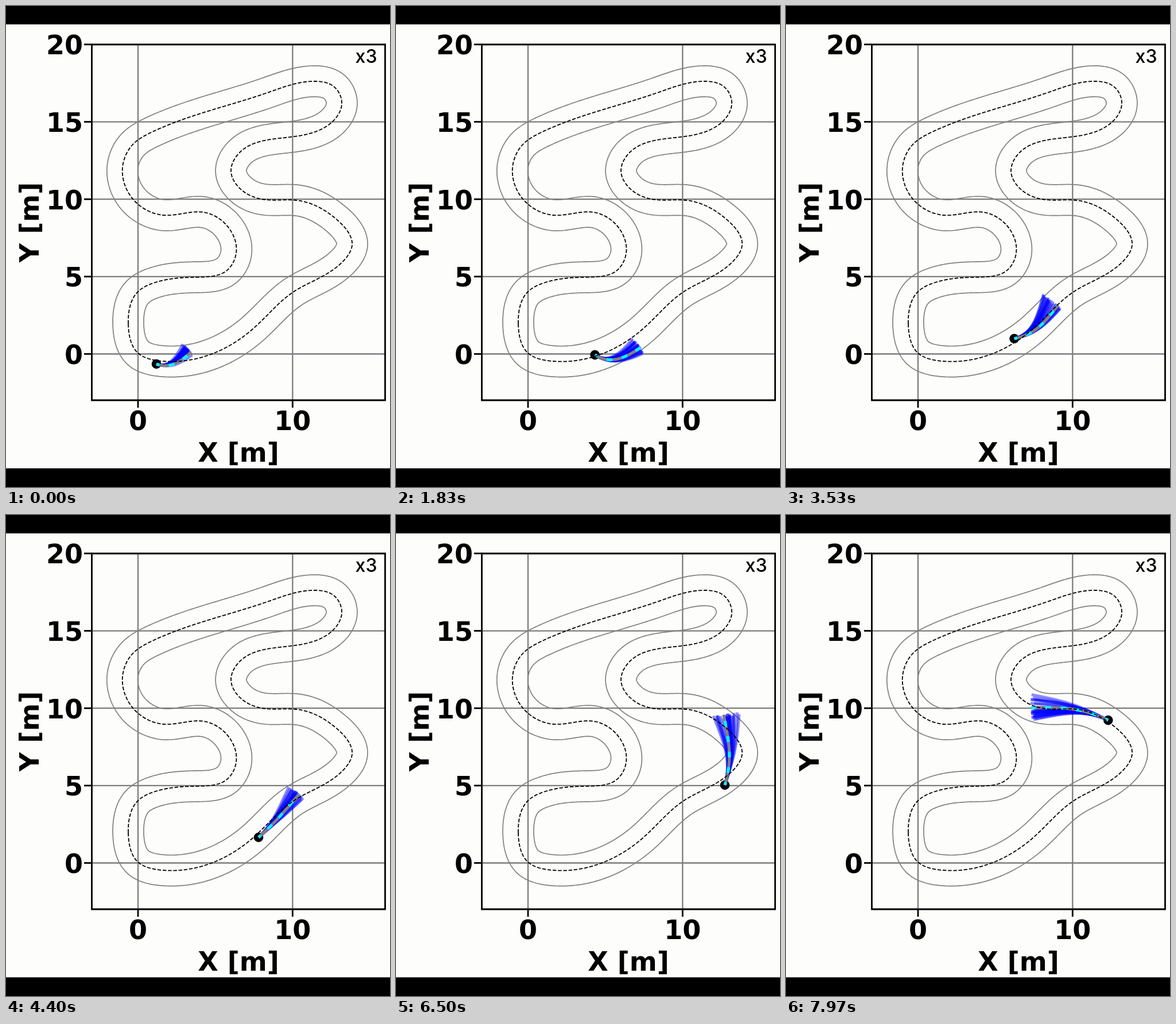
Recreate the animation shown at these times as an HTML page with a canvas. Size 669 by 837 pixels, loop 8000 ms.

```html
<!DOCTYPE html>
<html lang="en">
<head>
<meta charset="utf-8">
<title>Path planner on a track</title>
<style>
  html, body { margin: 0; width: 100%; height: 100%; overflow: hidden; background: #000; }
  canvas { display: block; width: 100vw; height: 100vh; }
</style>
</head>
<body>
<canvas width="669" height="837"></canvas>
<script>
const ctx = document.querySelector('canvas').getContext('2d');
const LOOP = 8000, STEP = 100 / 3, METER = 26.93, RAYS = 26;
const plotX = m => 230 + m * METER;
const plotY = m => 605.5 - m * METER;
const lerp = (a, b, k) => a + (b - a) * k;
const rad = deg => deg * Math.PI / 180;

// Centre line of the track, as waypoints of a closed cubic spline.
const WAYPOINTS = [
  [213, 553], [230, 604], [272, 618], [430, 562], [500, 498], [580, 451], [603, 416],
  [572, 368], [505, 338], [445, 336], [405, 315], [392, 288], [408, 254], [462, 232],
  [525, 223], [572, 198], [585, 170], [571, 140], [538, 131], [455, 151], [255, 219],
  [220, 242], [203, 281], [222, 337], [275, 364], [345, 359], [380, 377], [401, 430],
  [385, 460], [330, 472], [260, 481], [230, 497]
];

// Value and slope of a cubic Hermite segment lasting h, at fraction s.
function hermite(a, b, va, vb, h, s) {
  const c = 3 * (b - a) - h * (2 * va + vb), d = 2 * (a - b) + h * (va + vb);
  return [a + s * (h * va + s * (c + s * d)), va + s * (2 * c + 3 * s * d) / h];
}

function sampleClosedSpline(points, spacing) {
  const n = points.length, at = (list, i) => list[(i + n) % n];
  const h = points.map((p, i) => Math.hypot(at(points, i + 1)[0] - p[0], at(points, i + 1)[1] - p[1]));
  const slopes = points.map(() => [0, 0]);
  for (let pass = 0; pass < 40; pass++) {
    for (let i = 0; i < n; i++) {
      const before = at(h, i - 1), after = h[i];
      for (const k of [0, 1]) {
        const dBefore = (points[i][k] - at(points, i - 1)[k]) / before;
        const dAfter = (at(points, i + 1)[k] - points[i][k]) / after;
        slopes[i][k] = (3 * (after * dBefore + before * dAfter)
          - after * at(slopes, i - 1)[k] - before * at(slopes, i + 1)[k]) / (2 * (before + after));
      }
    }
  }
  const samples = [];
  for (let i = 0; i < n; i++) {
    for (let d = 0; d < h[i]; d += spacing) {
      const [[x, dx], [y, dy]] = [0, 1].map(k =>
        hermite(points[i][k], at(points, i + 1)[k], slopes[i][k], at(slopes, i + 1)[k], h[i], d / h[i]));
      samples.push({ x, y, angle: Math.atan2(dy, dx) });
    }
  }
  return samples;
}

function closedPath(points) {
  const path = new Path2D();
  for (const p of points) path.lineTo(p.x, p.y);
  path.closePath();
  return path;
}

// Parallel curve; samples that fall inside the lane are dropped at tight bends.
function border(samples, offset) {
  const limit = Math.abs(offset) * 0.98;
  return closedPath(samples
    .map(p => ({ x: p.x - offset * Math.sin(p.angle), y: p.y + offset * Math.cos(p.angle) }))
    .filter(p => samples.every(c => Math.hypot(c.x - p.x, c.y - p.y) > limit)));
}

const lane = sampleClosedSpline(WAYPOINTS, 3);
const centerLine = closedPath(lane);
const borders = [border(lane, METER), border(lane, -METER)];

// Key poses: time, position, heading, bearing of the plan's tip (degrees),
// and how far the fan of rays leans to the right of the plan.
const POSES = [
  [0,    262, 623, 20,   -19,  -8],
  [930,  306, 591, -15,  11,   9],
  [2630, 369, 602, -75,  -27,  -18],
  [4400, 440, 561, -42,  -47,  -5],
  [5570, 502, 493, 2,    -29,  11],
  [6500, 573, 470, -74,  -91,  3],
  [7970, 561, 357, -155, -171, -4]
].map(([t, x, y, heading, bearing, lean]) => {
  const speed = lerp(0.045, 0.085, t / LOOP);
  return { t, x, y, bearing: rad(bearing), lean,
           vx: speed * Math.cos(rad(heading)), vy: speed * Math.sin(rad(heading)) };
});

function stateAt(t) {
  let i = 0;
  while (i < POSES.length - 2 && t >= POSES[i + 1].t) i++;
  const a = POSES[i], b = POSES[i + 1], span = b.t - a.t;
  const k = Math.min(1, (t - a.t) / span);
  const [x, vx] = hermite(a.x, b.x, a.vx, b.vx, span, k);
  const [y, vy] = hermite(a.y, b.y, a.vy, b.vy, span, k);
  const heading = Math.atan2(vy, vx), bearing = lerp(a.bearing, b.bearing, k);
  return {
    x, y, heading, bearing,
    endHeading: bearing + 0.6 * (bearing - heading),
    length: lerp(64, 136, t / LOOP),
    lean: lerp(a.lean, b.lean, k),
    spread: lerp(8, 14, t / LOOP)
  };
}

function random(seed) {
  return () => {
    seed = seed + 0x6d2b79f5 | 0;
    let r = Math.imul(seed ^ seed >>> 15, seed | 1);
    r ^= r + Math.imul(r ^ r >>> 7, r | 61);
    return ((r ^ r >>> 14) >>> 0) / 4294967296;
  };
}

// The planned curve, bent sideways by `drift` pixels at its tip.
function planPath(s, drift, stretch = 1) {
  const path = new Path2D(), reach = s.length * 0.4;
  const ex = s.length * Math.cos(s.bearing), ey = s.length * Math.sin(s.bearing);
  const ux = Math.cos(s.endHeading), uy = Math.sin(s.endHeading);
  const bx = reach * Math.cos(s.heading), by = reach * Math.sin(s.heading);
  for (let i = 0; i <= 24; i++) {
    const k = i / 24 * stretch, q = 1 - k;
    const w1 = 3 * q * q * k, w2 = 3 * q * k * k, w3 = k * k * k;
    const side = drift * k ** 1.4;
    path.lineTo(s.x + w1 * bx + w2 * (ex - reach * ux) + w3 * ex - uy * side,
                s.y + w1 * by + w2 * (ey - reach * uy) + w3 * ey + ux * side);
  }
  return path;
}

function stroke(path, color, width, dash = [], dashOffset = 0) {
  ctx.strokeStyle = color;
  ctx.lineWidth = width;
  ctx.setLineDash(dash);
  ctx.lineDashOffset = dashOffset;
  ctx.stroke(path);
}

function line(x1, y1, x2, y2, color, width) {
  const path = new Path2D();
  path.moveTo(x1, y1);
  path.lineTo(x2, y2);
  stroke(path, color, width);
}

function label(text, x, y, align) {
  ctx.textAlign = align;
  ctx.fillText(text, x, y);
}

function drawBackground() {
  ctx.fillStyle = '#000';
  ctx.fillRect(0, 0, 669, 837);
  ctx.fillStyle = '#fdfdfb';
  ctx.fillRect(0, 32, 669, 772.5);
  for (const m of [0, 10]) line(plotX(m), 67, plotX(m), 686, '#7c7c7c', 2.3);
  for (const m of [0, 5, 10, 15]) line(149.5, plotY(m), 660.5, plotY(m), '#7c7c7c', 2.3);
  for (const path of borders) stroke(path, '#808080', 1.7);
}

function drawPlan(s, seed) {
  ctx.fillStyle = '#000';
  ctx.beginPath();
  ctx.arc(s.x, s.y, 8.3, 0, 2 * Math.PI);
  ctx.fill();
  const next = random(seed);
  for (let i = 0; i < RAYS; i++) {
    // The tangent packs most rays near the middle and leaves a few strays.
    const drift = s.lean + s.spread * Math.tan(2.2 * (next() - 0.5));
    stroke(planPath(s, drift, 0.96 + 0.05 * next()), 'rgba(0,0,255,.45)', 4.8);
  }
  const best = planPath(s, 0);
  stroke(best, '#808080', 5);
  stroke(best, '#00ffff', 5, [10, 17], 5);
}

function drawAxes() {
  const frame = new Path2D();
  frame.rect(149.5, 67, 511, 619);
  stroke(frame, '#000', 2.8);
  ctx.fillStyle = '#000';
  ctx.font = 'bold 46px "DejaVu Sans", sans-serif';
  for (const m of [0, 10]) {
    line(plotX(m), 686, plotX(m), 699, '#000', 2.8);
    label(m, plotX(m), 737.5, 'center');
  }
  for (const m of [0, 5, 10, 15, 20]) {
    line(136, plotY(m), 149.5, plotY(m), '#000', 2.8);
    label(m, 134, plotY(m) + 17.5, 'right');
  }
  label('X [m]', 405, 792.5, 'center');
  ctx.save();
  ctx.translate(57, 376.5);
  ctx.rotate(-Math.PI / 2);
  label('Y [m]', 0, 0, 'center');
  ctx.restore();
  ctx.font = '500 32px Inter, sans-serif';
  label('x3', 627.5, 99, 'center');
}

function draw(now) {
  // The small lead absorbs frame times rounded down to 10 ms.
  const step = Math.floor((now % LOOP + 5) / STEP);
  drawBackground();
  drawPlan(stateAt(step * STEP), step + 1);
  stroke(centerLine, '#000', 1.8, [6.4, 2.8]);
  drawAxes();
  requestAnimationFrame(draw);
}
requestAnimationFrame(draw);
</script>
</body>
</html>
```
